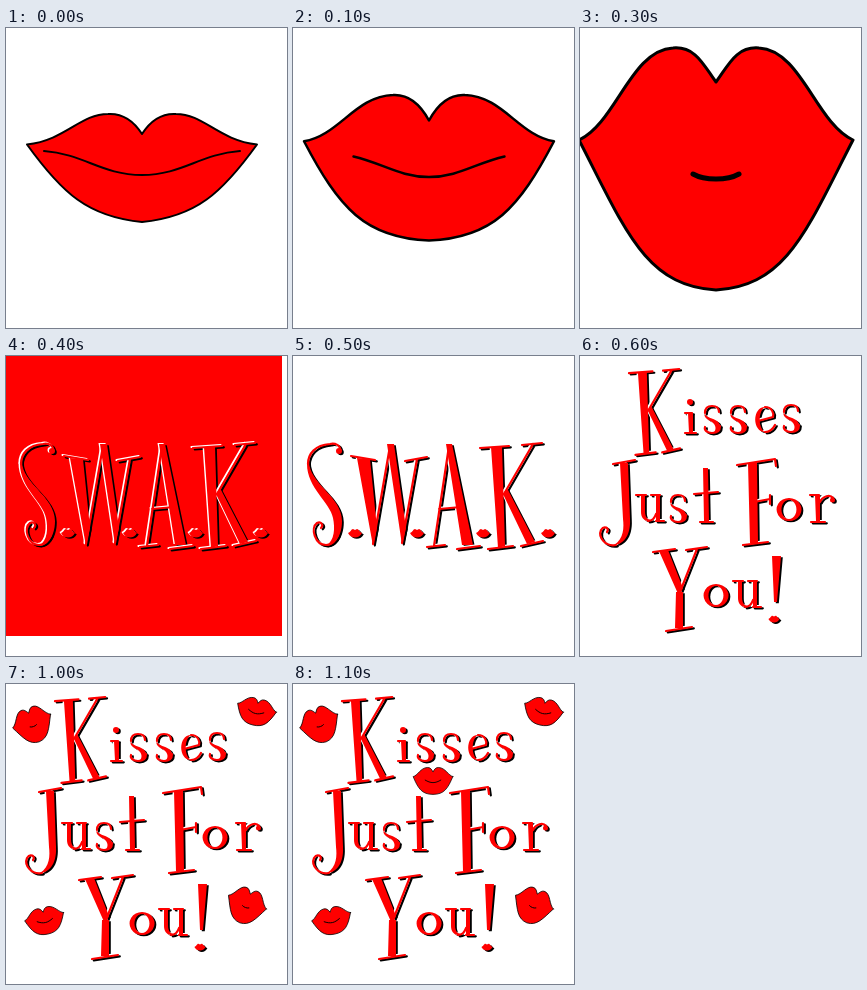
An HTML page with a canvas for the animation above (1.2 s loop, 281 px wide and 300 px high).

```html
<!DOCTYPE html>
<html lang="en">
<head>
<meta charset="utf-8">
<title>Kisses</title>
<style>
html, body { margin: 0; width: 100%; height: 100%; overflow: hidden; background: #fff; }
canvas { display: block; }
</style>
</head>
<body>
<canvas width="281" height="300" role="img" aria-label="S.W.A.K. Kisses Just For You!"></canvas>
<script>
const ctx = document.querySelector('canvas').getContext('2d');
const RED = '#f00';
const STEP = 100, STEPS = 12;
const CENTER = 136;

// Right half of each pose as points measured from the centre line:
// corner to peak to notch | corner to chin | mouth line
const poses = [
  { upper: [[115,116.5], [76,112], [62,86], [34,86], [18,85], [7,95], [0,106]],
    lower: [[115,116.5], [80,165], [54,189], [0,194]],
    mouth: [[98,123], [58,126], [40,147], [0,147]], edge: 2, line: 2 },
  { upper: [[135,110], [105,104], [85,50], [38,48], [18,47], [8,62], [0,79]],
    lower: [[135,110], [100,195], [74,231], [0,231]],
    mouth: [[53,134], [36,144], [18,151], [0,151]], edge: 3, line: 3 },
  { upper: [[137,112], [100,95], [85,22], [43,20], [20,18], [12,38], [0,54]],
    lower: [[137,112], [91,201], [71,258], [0,262]],
    mouth: [[23,146], [16,150], [8,151], [0,151]], edge: 3, line: 5 }
];

function mix(a, b) {
  if (typeof a === 'number') return (a + b) / 2;
  if (Array.isArray(a)) return a.map((v, i) => mix(v, b[i]));
  return Object.fromEntries(Object.keys(a).map(key => [key, mix(a[key], b[key])]));
}
const growth = [poses[0], mix(poses[0], poses[1]), poses[1], poses[2]];

const mirror = points => points.map(([x, y]) => [-x, y]);
const across = points => [...points, ...mirror(points).reverse().slice(1)];

function curve(points) {
  const path = new Path2D();
  path.moveTo(...points[0]);
  for (let i = 1; i < points.length; i += 3) {
    path.bezierCurveTo(...points.slice(i, i + 3).flat());
  }
  return path;
}

// Drawn around x = 0
function lips(pose, edge = pose.edge, line = pose.line) {
  const rim = curve([...across(pose.upper), ...across(mirror(pose.lower)).slice(1)]);
  rim.closePath();
  ctx.lineCap = ctx.lineJoin = 'round';
  ctx.fillStyle = RED;
  ctx.strokeStyle = '#000';
  ctx.fill(rim);
  ctx.lineWidth = edge;
  ctx.stroke(rim);
  ctx.lineWidth = line;
  ctx.stroke(curve(across(pose.mouth)));
}

function kiss([x, y, degrees, pose]) {
  ctx.save();
  ctx.translate(x, y);
  ctx.rotate(degrees * Math.PI / 180);
  ctx.scale(0.147, 0.147);
  ctx.translate(0, -140);
  lips(pose, 5, 6);
  ctx.restore();
}

// Each letter: heavy filled parts, then thin strokes
const glyphs = {
  S: ['M16 105C16 128 49 140 49 165C49 182 40 190 33 190C42 184 42 172 40 162C37 146 14 132 14 108zM43 95a3 3 0 1 0 6 0a3 3 0 1 0-6 0z',
      'M47 95C48 89 42 87 37 88C22 89 15 98 15 108M47 165C47 182 40 189 33 189C22 189 17 172 24 167C28 165 31 169 28 172'],
  W: ['M64 102L77 103 84 172 80 190zM94 88h7L113 172 109 189z',
      'M80 188L97 90M109 187L124 103M58 100L82 104M112 105L134 101'],
  A: ['M153 88h6L180 189h-11z',
      'M156 90L141 190M146 153L168 151M134 191L152 189M164 193L187 190'],
  K: ['M11 4L22 3 25 103 18 105zM23 51L27 45 55 99 47 101z',
      'M53 1L24 51M0 5L29 3M8 106L33 103M42 2L62 0M41 103L63 98'],
  J: ['M20 4h8L30 60C31 78 22 86 14 86C24 80 24 68 23 60z',
      'M13 5L35 1M16 86C5 88-2 78 1 71C4 66 10 69 7 73'],
  F: ['M12 5h9L22 85h-8z',
      'M1 7L39 1l1 7M18 44L34 41M34 37v9M7 87L32 84'],
  Y: ['M6 5L15 4 30 42 26 50zM23 46h7v36h-8z',
      'M44 3L27 46M0 6L22 3M33 4L54 1M13 85L39 81'],
  i: ['M4 9h5v20h-4zM3-2a3 3 0 1 0 6 0a3 3 0 1 0-6 0z', 'M1 9h7M1 29h11'],
  s: ['M2 9C2 15 17 14 17 22C17 27 14 29 10 29C14 26 13 21 9 18C4 15 0 13 2 9z',
      'M16 8C16 3 12 2 9 2C4 2 2 5 2 9M17 22C17 27 14 29 9 29C4 29 1 26 2 23'],
  e: ['M11 4C-2 4-2 29 11 29C4 25 4 8 11 4z',
      'M11 4C18 4 20 10 19 14L4 18M11 29C16 29 19 26 21 22'],
  u: ['M5 1h4v16C9 24 12 26 16 26C9 29 5 24 5 18zM20 1h4v26h-4z',
      'M0 1h10M15 1h9M20 20C18 26 15 27 12 27M20 27h8'],
  t: ['M9 1h5l1 53h-5z', 'M0 27L24 25M6 55h13'],
  o: ['M12 0a12.5 11.5 0 1 0 .1 0zM12 2a7.5 9.5 0 1 1-.1 0z', ''],
  r: ['M5 1h5v26h-4zM20 6a2.5 2.5 0 1 0 5 0a2.5 2.5 0 1 0-5 0z',
      'M0 1h9M1 28h14M10 8C13 2 20 0 23 4'],
  '!': ['M3 0h9L8 46h-3z', ''],
  '.': ['M-7 0C-4-1-4-4-2-4L0-3 2-4C4-4 4-1 7 0C4 6-4 6-7 0z', '']
};

// letter, x, y, scale
const initials = [
  ['S', 0, 0], ['.', 62, 177], ['W', 0, 0], ['.', 124, 177],
  ['A', 0, 0], ['.', 190, 177], ['K', 187, 87], ['.', 255, 177]
];
const message = [
  ['K', 49, 13, 0.81], ['i', 104, 48], ['s', 123, 48], ['s', 149, 48], ['e', 174, 47], ['s', 202, 47],
  ['J', 20, 103], ['u', 56, 138], ['s', 89, 137], ['t', 114, 111],
  ['F', 156, 102], ['o', 197, 142], ['r', 230, 138],
  ['Y', 73, 190], ['o', 124, 228], ['u', 153, 224], ['!', 189, 200], ['.', 194, 263, 0.8]
];
// x, y, tilt, pose
const kisses = [
  [27, 41, -20, poses[2]], [240, 222, 20, poses[2]], [250, 28, 13, poses[1]],
  [39, 237, -12, poses[1]], [140, 97, 0, poses[1]]
];

function outline(letters) {
  const heavy = new Path2D(), thin = new Path2D();
  for (const [name, x, y, scale = 1] of letters) {
    const place = new DOMMatrix([scale, 0, 0, scale, x, y]);
    heavy.addPath(new Path2D(glyphs[name][0]), place);
    thin.addPath(new Path2D(glyphs[name][1]), place);
  }
  return { heavy, thin };
}
const initialsArt = outline(initials), messageArt = outline(message);

// Dark lower edge, light upper edge, then the red face
function lettering({ heavy, thin }) {
  ctx.lineWidth = 2.2;
  ctx.lineCap = ctx.lineJoin = 'round';
  for (const [color, dx, dy] of [['#000', 1.8, 1.3], ['#fff', -1.5, -1], [RED, 0, 0]]) {
    ctx.save();
    ctx.translate(dx, dy);
    ctx.fillStyle = ctx.strokeStyle = color;
    ctx.fill(heavy);
    ctx.stroke(thin);
    ctx.restore();
  }
}

function draw() {
  const step = Math.floor(performance.now() / STEP) % STEPS;
  ctx.fillStyle = '#fff';
  ctx.fillRect(0, 0, 281, 300);
  if (step < 4) {
    ctx.save();
    ctx.translate(CENTER, 0);
    lips(growth[step]);
    ctx.restore();
  } else if (step < 6) {
    if (step === 4) {
      ctx.fillStyle = RED;
      ctx.fillRect(0, 0, 276, 280);
    }
    lettering(initialsArt);
  } else {
    lettering(messageArt);
    kisses.slice(0, step - 6).forEach(kiss);
  }
  requestAnimationFrame(draw);
}
draw();
</script>
</body>
</html>
```
